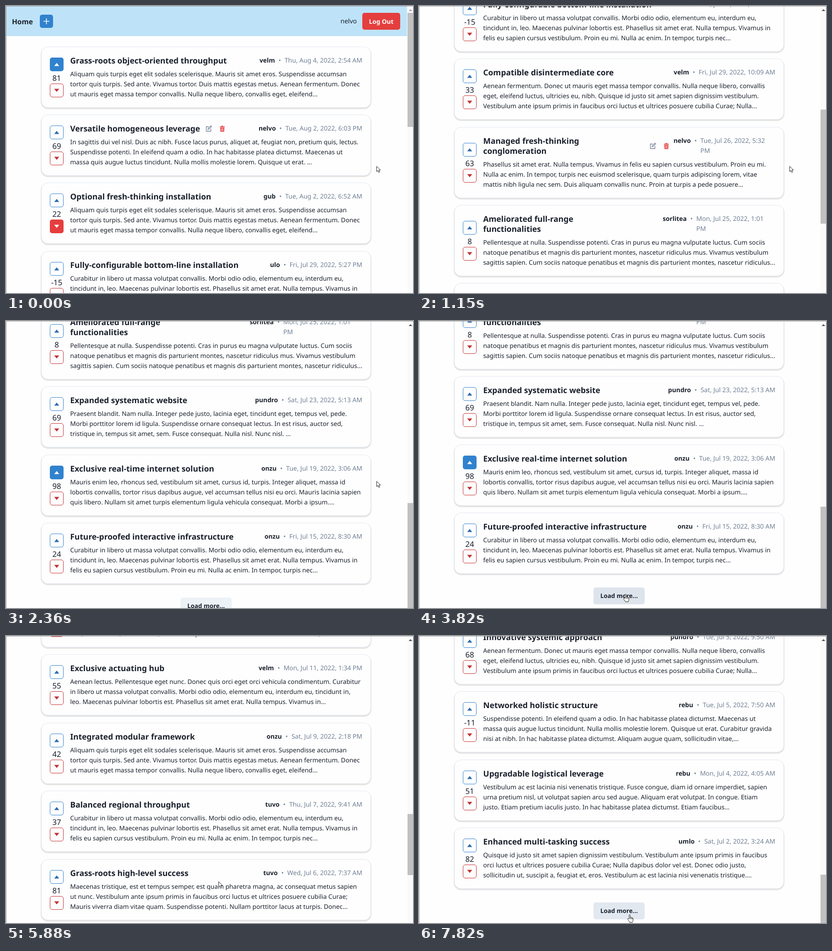
Recreate the animation shown at these times as an HTML page. Size 891 by 629 pixels, loop 8000 ms.

```html
<!DOCTYPE html>
<html lang="en">
<head>
<meta charset="utf-8">
<title>Post feed</title>
<style>
  html, body { margin: 0; width: 100%; height: 100%; overflow: hidden; background: #fefefe; }
  #stage { position: relative; width: 891px; height: 629px; overflow: hidden; color: #1a202c;
    font: 13.76px/22px "Noto Sans", "Open Sans", sans-serif; white-space: nowrap; text-rendering: geometricPrecision; }
  #stage * { box-sizing: border-box; }
  #stage div, #stage header, #stage article, #stage svg { position: absolute; }
  svg { left: 0; top: 0; }
  b, h2, .button { font-weight: 700; }
  #page { left: 0; top: 0; width: 878px; }
  #feed { left: 0; top: 0; }
  header { left: 0; top: 0; width: 878px; height: 66px; background: #bee3f8; }
  .button { border-radius: 5px; text-align: center; font-size: 13.6px; }
  .red { background: #e53e3e; color: #fff; }
  .blue { background: #3182ce; color: #fff; }
  article { left: 77px; width: 722px; border: 1px solid #e2e8f0; border-radius: 15px;
    background: #fefefe; box-shadow: 0 2px 1px 1px #e4e4e4; clip-path: inset(0 -2px -5px -2px); }
  h2, .meta span, .text { white-space: pre; }
  h2 { position: absolute; margin: 0; left: 62.5px; top: 19px; font-size: 17.4px; line-height: 22px; }
  .meta { right: 18px; top: 19px; display: flex; font-size: 13.8px; }
  .meta span { color: #718096; font-size: 14px; }
  .meta i { font-style: normal; color: #718096; width: 21px; text-align: center; }
  .text { left: 62.5px; line-height: 22.1px; }
  .vote { left: 18px; width: 30px; height: 30px; border: 1px solid; border-radius: 5px; }
  .vote svg { left: 8px; top: 10px; }
  .up { color: #3182ce; fill: #2b6cb0; }
  .down { color: #c53030; fill: #c53030; }
  .vote.on { border: 0; fill: #fff; }
  .vote.on svg { left: 9px; top: 11px; }
  .up.on { background: #3182ce; }
  .down.on { background: #e53e3e; }
  .count { left: 8px; width: 50px; text-align: center; font-size: 16.8px; }
  #more { left: 382px; width: 112px; height: 37px; line-height: 37px; font-size: 13.3px; }
  #track { left: 879px; top: 0; width: 12px; height: 629px; background: #fafafa; }
  #thumb { left: 0; width: 12px; background: #c1c1c1; }
  #edge { inset: 0; border: solid #a6a6a6; border-width: 1px 0 0 1px; }
</style>
</head>
<body>
<div id="stage">
  <div id="page">
    <header>
      <b style="position:absolute;left:13px;top:23px;font-size:15.5px">Home</b>
      <div class="button blue" style="left:74px;top:19px;width:29px;height:29px">
        <svg width="29" height="29"><path d="M14.5 8v13M8 14.5h13" stroke="#fff" stroke-width="1.6"/></svg>
      </div>
      <div style="right:110px;top:23px;font-size:14px">nelvo</div>
      <div class="button red" style="left:780px;top:15px;width:83px;height:37px;line-height:37px">Log Out</div>
    </header>
    <div id="feed"></div>
    <div id="more" class="button">Load more...</div>
  </div>
  <div id="track">
    <svg width="12" height="15"><path id="arrowUp" d="M2.5 11l4-4 4 4z"/></svg>
    <div id="thumb"></div>
  </div>
  <div id="edge"></div>
  <svg id="cursor" width="20" height="22" style="overflow:visible" fill="#fff" stroke="#222" stroke-linejoin="round">
    <path id="arrow" d="M.5 .5V12l2.7-2.5 1.9 4.3 2-.9-1.9-4.2H9z"/>
    <path id="hand" d="M4 10V2c0-2 2.4-2 2.4 0v5c.3-1 2.2-.8 2.3.4.4-.9 2-.6 2.1.6.5-.6 1.7-.2 1.7 1v4c0 1.8-1.3 2.4-1.3 4.5H5c0-2-3.6-4.8-4.2-6.8C.5 9.3 2 8.6 2.8 9.6zM6.4 7v3.5M8.7 7.5v3M10.8 8v2.5"/>
  </svg>
</div>
<script>
const LOOP = 8000, LOADED_AT = 4220, PITCH = 149.4, PAGE_SIZE = 10;
const $ = id => document.getElementById(id);

const T = {
  aliquam: "Aliquam quis turpis eget elit sodales scelerisque. Mauris sit amet eros. Suspendisse accumsan\ntortor quis turpis. Sed ante. Vivamus tortor. Duis mattis egestas metus. Aenean fermentum. Donec\nut mauris eget massa tempor convallis. Nulla neque libero, convallis eget, eleifend...",
  curabitur: "Curabitur in libero ut massa volutpat convallis. Morbi odio odio, elementum eu, interdum eu,\ntincidunt in, leo. Maecenas pulvinar lobortis est. Phasellus sit amet erat. Nulla tempus. Vivamus in\nfelis eu sapien cursus vestibulum. Proin eu mi. Nulla ac enim. In tempor, turpis nec...",
  aenean: "Aenean fermentum. Donec ut mauris eget massa tempor convallis. Nulla neque libero, convallis\neget, eleifend luctus, ultricies eu, nibh. Quisque id justo sit amet sapien dignissim vestibulum.\nVestibulum ante ipsum primis in faucibus orci luctus et ultrices posuere cubilia Curae; Nulla..."
};

// title, author, date, score, text, then optional: vote, icons' x, date width
const posts = [
  ["Grass-roots object-oriented throughput", "velm", "Thu, Aug 4, 2022, 2:54 AM", 81, T.aliquam, { vote: "up" }],
  ["Versatile homogeneous leverage", "nelvo", "Tue, Aug 2, 2022, 6:03 PM", 69, "In sagittis dui vel nisl. Duis ac nibh. Fusce lacus purus, aliquet at, feugiat non, pretium quis, lectus.\nSuspendisse potenti. In eleifend quam a odio. In hac habitasse platea dictumst. Maecenas ut\nmassa quis augue luctus tincidunt. Nulla mollis molestie lorem. Quisque ut erat. ...", { icons: 437 }],
  ["Optional fresh-thinking installation", "gub", "Tue, Aug 2, 2022, 6:52 AM", 22, T.aliquam, { vote: "down" }],
  ["Fully-configurable bottom-line installation", "ulo", "Fri, Jul 29, 2022, 5:27 PM", -15, T.curabitur],
  ["Compatible disintermediate core", "velm", "Fri, Jul 29, 2022, 10:09 AM", 33, T.aenean],
  ["Managed fresh-thinking\nconglomeration", "nelvo", "Tue, Jul 26, 2022, 5:32\nPM", 63, "Phasellus sit amet erat. Nulla tempus. Vivamus in felis eu sapien cursus vestibulum. Proin eu mi.\nNulla ac enim. In tempor, turpis nec euismod scelerisque, quam turpis adipiscing lorem, vitae\nmattis nibh ligula nec sem. Duis aliquam convallis nunc. Proin at turpis a pede posuere...", { icons: 505, dateWidth: 164 }],
  ["Ameliorated full-range\nfunctionalities", "sorlitea", "Mon, Jul 25, 2022, 1:01\nPM", 8, "Pellentesque at nulla. Suspendisse potenti. Cras in purus eu magna vulputate luctus. Cum sociis\nnatoque penatibus et magnis dis parturient montes, nascetur ridiculus mus. Vivamus vestibulum\nsagittis sapien. Cum sociis natoque penatibus et magnis dis parturient montes, nascetur ridiculus...", { dateWidth: 173 }],
  ["Expanded systematic website", "pundro", "Sat, Jul 23, 2022, 5:13 AM", 69, "Praesent blandit. Nam nulla. Integer pede justo, lacinia eget, tincidunt eget, tempus vel, pede.\nMorbi porttitor lorem id ligula. Suspendisse ornare consequat lectus. In est risus, auctor sed,\ntristique in, tempus sit amet, sem. Fusce consequat. Nulla nisl. Nunc nisl. ..."],
  ["Exclusive real-time internet solution", "onzu", "Tue, Jul 19, 2022, 3:06 AM", 98, "Mauris enim leo, rhoncus sed, vestibulum sit amet, cursus id, turpis. Integer aliquet, massa id\nlobortis convallis, tortor risus dapibus augue, vel accumsan tellus nisi eu orci. Mauris lacinia sapien\nquis libero. Nullam sit amet turpis elementum ligula vehicula consequat. Morbi a ipsum....", { vote: "up" }],
  ["Future-proofed interactive infrastructure", "onzu", "Fri, Jul 15, 2022, 8:30 AM", 24, T.curabitur],
  ["Profound discrete attitude", "dorvun", "Wed, Jul 13, 2022, 6:26 AM", 77, "Vestibulum quam sapien, varius ut, blandit non, interdum in, ante. Vestibulum ante ipsum primis in\nfaucibus orci luctus et ultrices posuere cubilia Curae; Duis faucibus accumsan odio. Curabitur\nconvallis. Duis consequat dui nec nisi volutpat eleifend. Donec ut dolor. Morbi vel lectus in..."],
  ["Seamless maximized knowledge user", "velm", "Tue, Jul 12, 2022, 7:01 PM", 15, "Nullam porttitor lacus at turpis. Donec posuere metus vitae ipsum. Aliquam non mauris. Morbi\nnon lectus. Aliquam sit amet diam in magna bibendum imperdiet. Nullam orci pede, venenatis\nnon, sodales sed, tincidunt eu, felis. Fusce posuere felis sed lacus. Morbi sem mauris, laoreet..."],
  ["Exclusive actuating hub", "velm", "Mon, Jul 11, 2022, 1:34 PM", 55, "Aenean lectus. Pellentesque eget nunc. Donec quis orci eget orci vehicula condimentum. Curabitur\nin libero ut massa volutpat convallis. Morbi odio odio, elementum eu, interdum eu, tincidunt in,\nleo. Maecenas pulvinar lobortis est. Phasellus sit amet erat. Nulla tempus. Vivamus in..."],
  ["Integrated modular framework", "onzu", "Sat, Jul 9, 2022, 2:18 PM", 42, T.aliquam],
  ["Balanced regional throughput", "tuvo", "Thu, Jul 7, 2022, 9:41 AM", 37, T.curabitur],
  ["Grass-roots high-level success", "tuvo", "Wed, Jul 6, 2022, 7:37 AM", 81, "Maecenas tristique, est et tempus semper, est quam pharetra magna, ac consequat metus sapien\nut nunc. Vestibulum ante ipsum primis in faucibus orci luctus et ultrices posuere cubilia Curae;\nMauris viverra diam vitae quam. Suspendisse potenti. Nullam porttitor lacus at turpis. Donec..."],
  ["Innovative systemic approach", "pundro", "Tue, Jul 5, 2022, 9:50 AM", 68, T.aenean],
  ["Networked holistic structure", "rebu", "Tue, Jul 5, 2022, 7:50 AM", -11, "Suspendisse potenti. In eleifend quam a odio. In hac habitasse platea dictumst. Maecenas ut\nmassa quis augue luctus tincidunt. Nulla mollis molestie lorem. Quisque ut erat. Curabitur gravida\nnisi at nibh. In hac habitasse platea dictumst. Aliquam augue quam, sollicitudin vitae,..."],
  ["Upgradable logistical leverage", "rebu", "Mon, Jul 4, 2022, 4:05 AM", 51, "Vestibulum ac est lacinia nisi venenatis tristique. Fusce congue, diam id ornare imperdiet, sapien\nurna pretium nisl, ut volutpat sapien arcu sed augue. Aliquam erat volutpat. In congue. Etiam\njusto. Etiam pretium iaculis justo. In hac habitasse platea dictumst. Etiam faucibus..."],
  ["Enhanced multi-tasking success", "umlo", "Sat, Jul 2, 2022, 3:24 AM", 82, "Quisque id justo sit amet sapien dignissim vestibulum. Vestibulum ante ipsum primis in faucibus\norci luctus et ultrices posuere cubilia Curae; Nulla dapibus dolor vel est. Donec odio justo,\nsollicitudin ut, suscipit a, feugiat et, eros. Vestibulum ac est lacinia nisi venenatis tristique...."]
];

const voteButton = (dir, active, top) => `<div class="vote ${dir} ${active === dir ? "on" : ""}" style="top:${top}px">
  <svg width="12" height="8"><path d="${dir === "up" ? "M.5 7.5L6 .8l5.5 6.7z" : "M.5 .5L6 7.2 11.5 .5z"}"/></svg></div>`;

const icons = (x, top) => `<svg style="left:${x - 78}px;top:${top}px" width="46" height="16" fill="none">
  <path d="M7 3.5H1.5v10h10V8M5 9.5l.5-2L11.5 1.5l1.7 1.7-6 6z" stroke="#718096" stroke-width="1.3"/>
  <path d="M31 3h11v1.6H31zM34.5 1.5h4V3h-4zM32 5.5h9l-.5 9h-8z" fill="#e53e3e"/>
  <path d="M34.7 7v6M36.5 7v6M38.3 7v6" stroke="#fff" stroke-width=".8"/></svg>`;

let nextTop = 88.6;
$("feed").innerHTML = posts.map(([title, author, date, score, text, { vote, icons: iconX, dateWidth } = {}], i) => {
  const extra = title.includes("\n") ? 22 : 0, mid = extra / 2;
  const top = Math.round(nextTop);
  nextTop += PITCH + extra;
  return `<article style="top:${top}px;height:${134 + extra}px" ${i < PAGE_SIZE ? "" : "class=extra"}>
    ${voteButton("up", vote, 23 + mid)}
    <div class="count" style="top:${56.5 + mid}px">${score}</div>
    ${voteButton("down", vote, 80 + mid)}
    <h2>${title}</h2>${iconX ? icons(iconX, 21.5 + mid) : ""}
    <div class="meta"><b>${author}</b><i>•</i><span style="${dateWidth ? `width:${dateWidth}px` : ""}">${date}</span></div>
    <div class="text" style="top:${48.5 + extra}px">${text}</div></article>`;
}).join("");
const extras = document.querySelectorAll(".extra");

// [start time, scroll offset]
const scrollSteps = [
  [0, 0], [530, 2], [670, 95], [790, 215], [910, 335], [1030, 455], [1150, 571], [1270, 672], [1390, 740],
  [1540, 795], [1670, 860], [1800, 899], [1950, 915], [2100, 965], [2240, 1000], [2360, 1035], [2500, 1057],
  [4860, 1085], [4980, 1195], [5100, 1310], [5220, 1425], [5340, 1530], [5480, 1565], [5620, 1655],
  [5760, 1765], [5880, 1885], [6000, 2010], [6120, 2140], [6260, 2257], [6510, 2337], [6630, 2357],
  [6770, 2410], [6890, 2490], [7010, 2551]
];
// [start time, x, y, is hand]
const cursorSteps = [
  [0, 811, 351, 0], [2910, 589, 507, 0], [3060, 522, 556, 0], [3190, 464, 592, 1], [3310, 447, 598, 1],
  [4470, 457, 562, 0], [4590, 465, 538, 0], [7420, 465, 550, 0], [7540, 465, 570, 0],
  [7680, 458, 603, 1], [7820, 456, 610, 1]
];
const buttonSteps = [[0, "#edf2f7"], [3190, "#e2e8f0"], [3570, "#dde4ec"], [LOADED_AT, "#edf2f7"], [7680, "#e2e8f0"]];
const at = (steps, t) => steps.findLast(step => step[0] <= t);

function draw(t) {
  const scroll = at(scrollSteps, t)[1], loaded = t >= LOADED_AT;
  const [, x, y, isHand] = at(cursorSteps, t);
  $("page").style.transform = `translateY(${-scroll}px)`;
  extras.forEach(card => card.style.display = loaded ? "" : "none");
  $("more").style.top = 1641 + (loaded ? PAGE_SIZE * PITCH : 0) + "px";
  $("more").style.background = at(buttonSteps, t)[1];
  $("thumb").style.top = Math.round(15 + scroll * (loaded ? 0.199 : 0.3713)) + "px";
  $("thumb").style.height = (loaded ? 134 : 250) + "px";
  $("arrowUp").setAttribute("fill", scroll ? "#505050" : "#a3a3a3");
  $("cursor").style.transform = `translate(${x}px, ${y}px)`;
  $("hand").style.display = isHand ? "" : "none";
  $("arrow").style.display = isHand ? "none" : "";
}

const start = performance.now();
function tick() {
  draw((performance.now() - start) % LOOP);
  requestAnimationFrame(tick);
}
tick();
</script>
</body>
</html>
```
